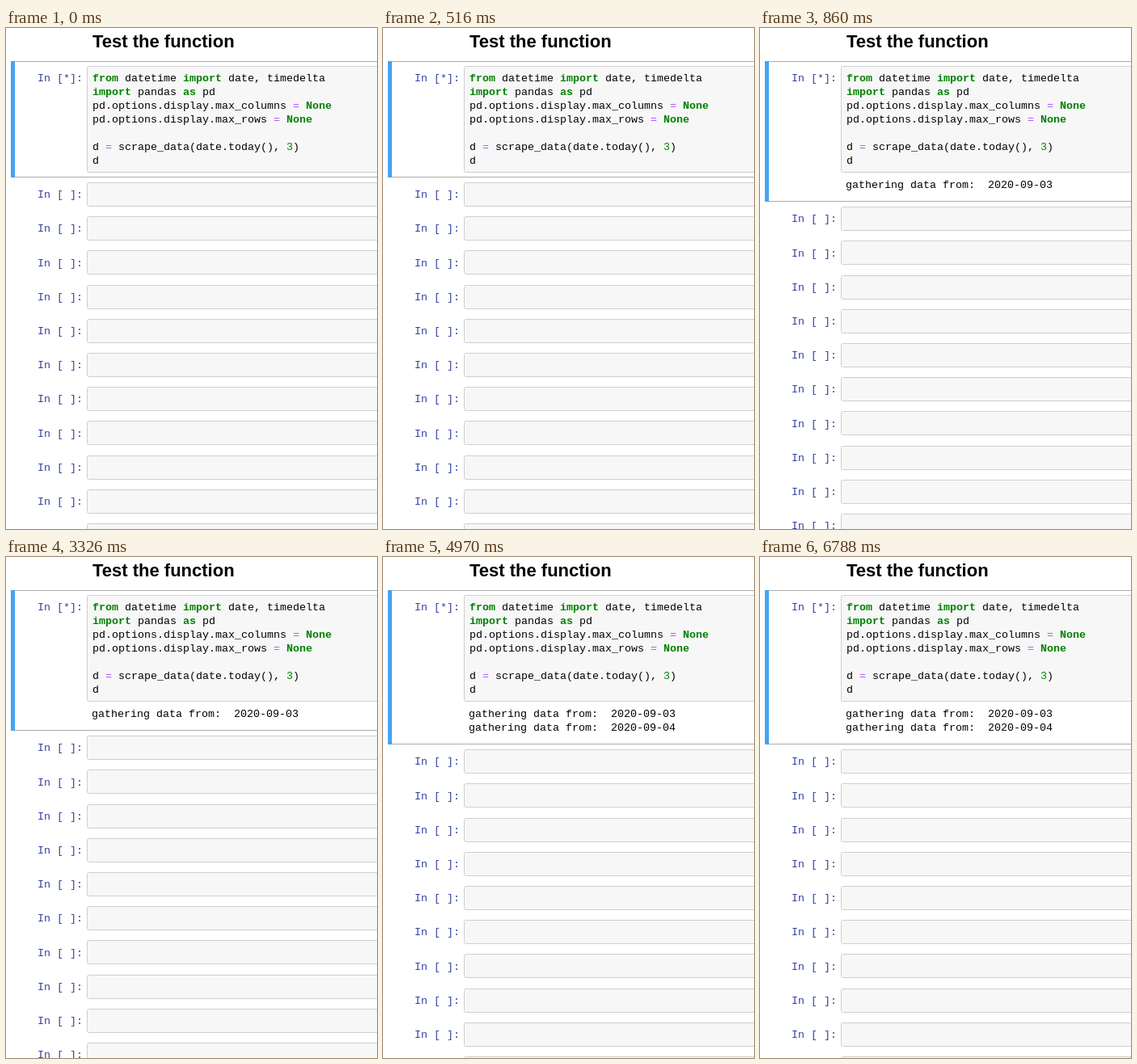
Recreate the animation shown at these times as an HTML page with a canvas. Size 459 by 620 pixels, loop 8 s.

```html
<!DOCTYPE html>
<html lang="en">
<head>
<meta charset="utf-8">
<title>Notebook run</title>
<style>
html, body { margin: 0; width: 100%; height: 100%; overflow: hidden; background: #fff; }
canvas { display: block; width: 459px; height: 620px; }
</style>
</head>
<body>
<canvas id="stage"></canvas>
<script>
const W = 459, H = 620, LOOP = 8000;
const MONO = '13.333px "Liberation Mono", "Courier New", monospace';
const BOLD = 'bold ' + MONO;
const HEAD = 'bold 22px "Liberation Sans", Arial, sans-serif';
const CHAR = 8, LINE = 17, ROW = 42.2;
const INK = '#000', KEY = '#008000', OP = '#aa55ff', NUM = '#008800', PROMPT = '#303f9f';

// Words wrapped in * are keywords.
const CODE = [
  '*from* datetime *import* date, timedelta',
  '*import* pandas *as* pd',
  'pd.options.display.max_columns = *None*',
  'pd.options.display.max_rows = *None*',
  '',
  'd = scrape_data(date.today(), 3)',
  'd'
];
const OUTPUT = ['2020-09-03', '2020-09-04'];

// Start of each state, printed lines, bottom of the active cell, first empty cell.
const STATES = [
  { at: 0, lines: 0, bottom: 184, first: 191.2 },
  { at: 860, lines: 1, bottom: 214, first: 221.4 },
  { at: 4970, lines: 2, bottom: 231, first: 238.4 }
];

const canvas = document.getElementById('stage');
const ctx = canvas.getContext('2d');
const dpr = window.devicePixelRatio || 1;
canvas.width = W * dpr;
canvas.height = H * dpr;
ctx.scale(dpr, dpr);

function text(str, x, y, color = INK, font = MONO) {
  ctx.font = font;
  ctx.fillStyle = color;
  ctx.fillText(str, x, y);
}

function rect(x, y, w, h, color) {
  ctx.fillStyle = color;
  ctx.fillRect(x, y, w, h);
}

function inputBox(y, h) {
  ctx.beginPath();
  ctx.roundRect(100.5, y + 0.5, W, h - 1, 2);
  ctx.fillStyle = '#f7f7f7';
  ctx.fill();
  ctx.strokeStyle = '#cfcfcf';
  ctx.lineWidth = 1;
  ctx.stroke();
}

function codeLine(src, x, y) {
  src.split('*').forEach((part, i) => {
    if (i % 2) {
      text(part, x, y, KEY, BOLD);
      x += part.length * CHAR;
      return;
    }
    for (const piece of part.split(/(=|\d)/)) {
      const color = piece === '=' ? OP : /^\d$/.test(piece) ? NUM : INK;
      text(piece, x, y, color);
      x += piece.length * CHAR;
    }
  });
}

function activeCell(state) {
  rect(6, 41, W, 1, '#ababab');
  rect(6, state.bottom, W, 1, '#ababab');
  rect(6, 41, 5, state.bottom - 40, '#42a5f5');
  inputBox(47, 132);
  text('In [*]:', 39, 66, PROMPT);
  CODE.forEach((line, i) => codeLine(line, 107, 66 + i * LINE));
  OUTPUT.slice(0, state.lines).forEach((day, i) =>
    text('gathering data from:  ' + day, 106, 198 + i * LINE));
}

function emptyCells(first) {
  for (let y = first; y < H; y += ROW) {
    inputBox(Math.round(y - 0.2), 30);
    text('In [ ]:', 39, Math.round(y) + 19, PROMPT);
  }
}

function draw(t) {
  const state = STATES.filter(s => s.at <= t).pop();
  rect(0, 0, W, H, '#fff');
  text('Test the function', 107, 24, INK, HEAD);
  activeCell(state);
  emptyCells(state.first);
}

const start = performance.now();
function tick() {
  draw((performance.now() - start) % LOOP);
  requestAnimationFrame(tick);
}
tick();
</script>
</body>
</html>
```
